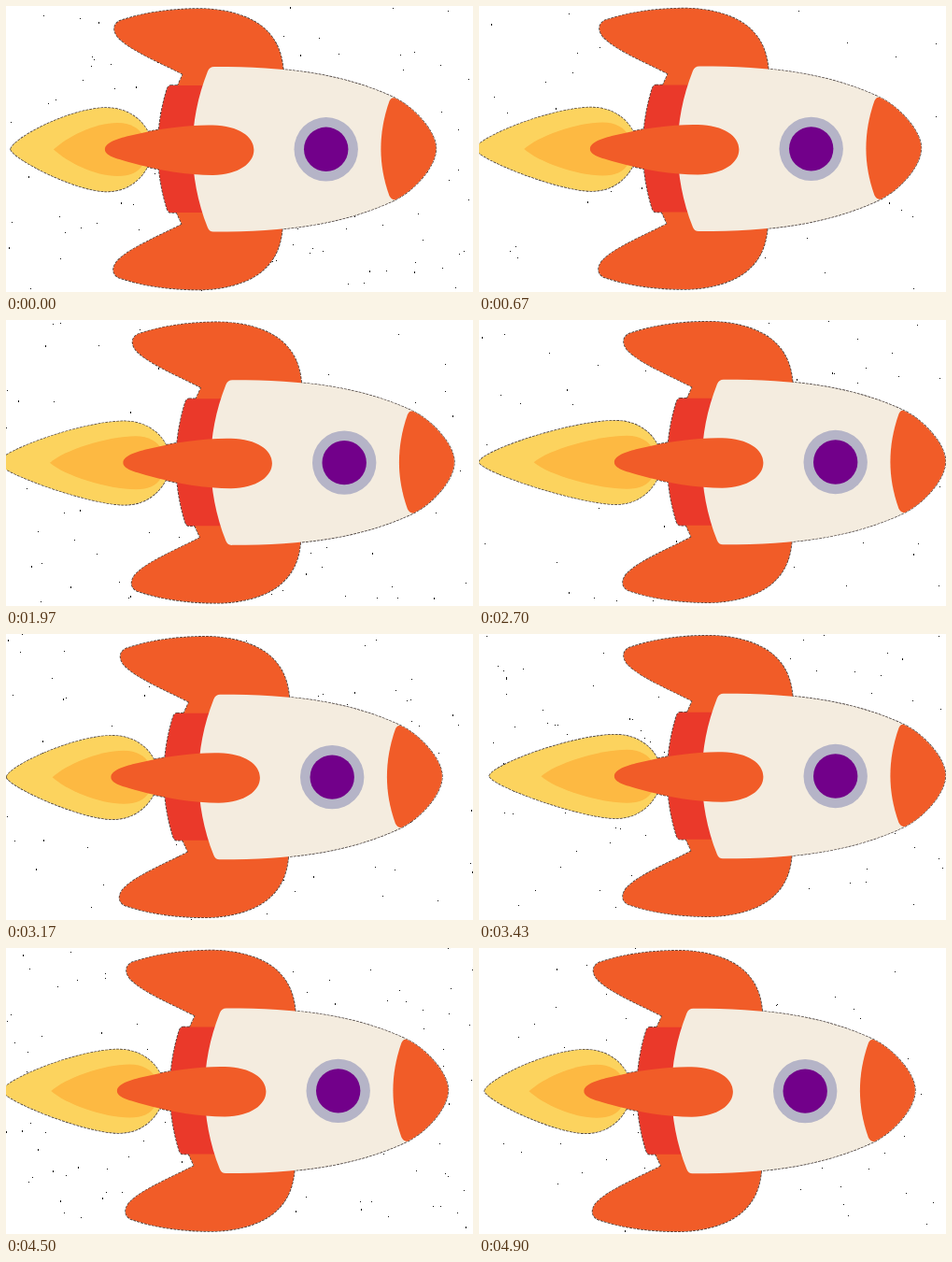
An HTML page with a canvas for the animation above (4.96 s loop, 500x306 px).

```html
<!DOCTYPE html>
<html lang="en">
<head>
<meta charset="utf-8">
<title>Rocket</title>
<style>
  html, body { margin: 0; width: 100%; height: 100%; overflow: hidden; background: #fff; }
  canvas { display: block; }
</style>
</head>
<body>
<canvas id="stage" width="500" height="306"></canvas>
<script>
const ctx = document.getElementById('stage').getContext('2d');
const LOOP = 4960;
const CYCLE = 14;

// [time in ms, step]: steps run evenly between neighbouring keys.
const TIMING = [
  [0, 0], [30, 1], [530, 13], [570, 14], [1070, 25], [1100, 26], [1330, 31],
  [1370, 32], [1570, 37], [1630, 38], [1970, 45], [2000, 46], [2100, 49],
  [2170, 50], [2670, 61], [2700, 62], [2770, 63], [3030, 70], [3170, 71],
  [3430, 78], [3470, 79], [3670, 84], [3800, 85], [4030, 91], [4070, 92],
  [4300, 98], [4430, 99], [4900, 111], [LOOP, 112]
];

const COLOR = {
  orange: '#f15c28', red: '#ea392a', cream: '#f4ecdf', ring: '#b5b4c7',
  purple: '#72008a', flame: '#fcd35e', core: '#fdb942', edge: '#4a403c'
};

const upperFin = new Path2D(`M190 73 C165 60 135 48 121 34 C115 27 115 20 122 16
  C145 8 175 3 207 3 C235 3 258 10 272 20 C287 31 296 46 297.5 70 L215 95 L184 86 Z`);
const lowerFin = new Path2D();
lowerFin.addPath(upperFin, new DOMMatrix([1, 0, 0, -1, -1, 306.5]));

const engine = new Path2D(`M177 85 H215 V221 H177 Q174.5 221 173 217
  C160 175 160 131 173 89 Q174.5 85 177 85 Z`);
const hull = new Path2D(`M223.5 65 C300 65 360 72 416 98 C437 108 461 134 461 152.5
  C461 172 437 198 416 208 C360 234 300 241.5 223.5 241.5 Q218.5 242 216.5 237
  C195 182 195 124 216.5 70 Q218.5 65 223.5 65 Z`);
const nose = new Path2D(`M417 98.5 C437 108 461 134 461 152.5 C461 172 437 198 417 207.5
  Q413 207 411 203 C399 170 399 136 411 102 Q413 97 417 98.5 Z`);
const tailFin = new Path2D(`M106.5 153.5 C106.5 146 120 142 132 139 C165 131 195 127 222 127.5
  C250 128 266 140 266 154 C266 168 250 180.5 222 181
  C195 181 165 176 132 167 C118 163 106.5 160 106.5 153.5 Z`);

function outerFlame(stretch) {
  const tip = 5.6 - 5.5 * stretch;
  const upperBend = 70 - 1.2 * stretch;
  const lowerBend = 75 - 0.9 * stretch;
  return new Path2D(`M${tip} 153.3 C${tip + 3} 141 ${upperBend} 109 108 109
    C130 109 147 121 154 138 C156 150 156 158 154 168
    C147 184 132 198.5 108 198.5 C${lowerBend} 198 ${tip + 3} 164 ${tip} 153.3 Z`);
}

function innerFlame(stretch) {
  const tip = 51.5 - 3.9 * stretch;
  const bend = 95 - 0.8 * stretch;
  return new Path2D(`M${tip} 153.5 C${tip + 15} 140 ${bend} 125 120 125
    C134 125 143 131 147 138 V170 C142 178 134 182 120 182
    C${bend} 182 ${tip + 15} 167 ${tip} 153.5 Z`);
}

function disc(x, y, radius) {
  const path = new Path2D();
  path.arc(x, y, radius, 0, 2 * Math.PI);
  return path;
}

function seeded(seed) {
  let state = (seed + 1) * 7919;
  return () => {
    state = (state + 0x6d2b79f5) | 0;
    let v = Math.imul(state ^ (state >>> 15), state | 1);
    v ^= v + Math.imul(v ^ (v >>> 7), v | 61);
    return ((v ^ (v >>> 14)) >>> 0) / 4294967296;
  };
}

function fill(path, color) {
  ctx.fillStyle = color;
  ctx.fill(path);
}

function drawSpecks(step) {
  const random = seeded(step);
  const count = 60 + 90 * random();
  ctx.fillStyle = '#111';
  for (let i = 0; i < count; i++) {
    const x = Math.floor(random() * 500);
    const y = Math.floor(random() * 306);
    ctx.fillRect(x, y, 1, random() < 0.15 ? 2 : 1);
  }
}

function drawRocket(step) {
  const phase = step % CYCLE;
  const shift = Math.min(phase, CYCLE - phase);
  const stretch = Math.min(2 * phase, CYCLE - phase);
  const flame = outerFlame(stretch);

  ctx.save();
  ctx.translate(6.5 * shift - 0.6, -0.22 * shift);

  // Thin broken rim around the silhouette
  ctx.strokeStyle = COLOR.edge;
  ctx.lineWidth = 1.5;
  ctx.setLineDash([3, 1]);
  for (const path of [flame, upperFin, lowerFin, engine, hull, tailFin]) ctx.stroke(path);

  fill(flame, COLOR.flame);
  fill(innerFlame(stretch), COLOR.core);
  fill(upperFin, COLOR.orange);
  fill(lowerFin, COLOR.orange);
  fill(engine, COLOR.red);
  fill(hull, COLOR.cream);
  fill(nose, COLOR.orange);
  fill(disc(343.3, 153.3, 34.2), COLOR.ring);
  fill(disc(343.3, 153.3, 23.7), COLOR.purple);
  fill(tailFin, COLOR.orange);
  ctx.restore();
}

function stepAt(time) {
  const next = TIMING.findIndex(key => key[0] > time);
  const [t0, s0] = TIMING[next - 1];
  const [t1, s1] = TIMING[next];
  return Math.floor(s0 + (s1 - s0) * (time - t0) / (t1 - t0) + 1e-6);
}

const start = performance.now();
let shown = -1;

function render() {
  const step = stepAt(Math.max(0, performance.now() - start) % LOOP);
  if (step !== shown) {
    shown = step;
    ctx.fillStyle = '#fff';
    ctx.fillRect(0, 0, 500, 306);
    drawSpecks(step);
    drawRocket(step);
  }
  requestAnimationFrame(render);
}
render();
</script>
</body>
</html>
```
